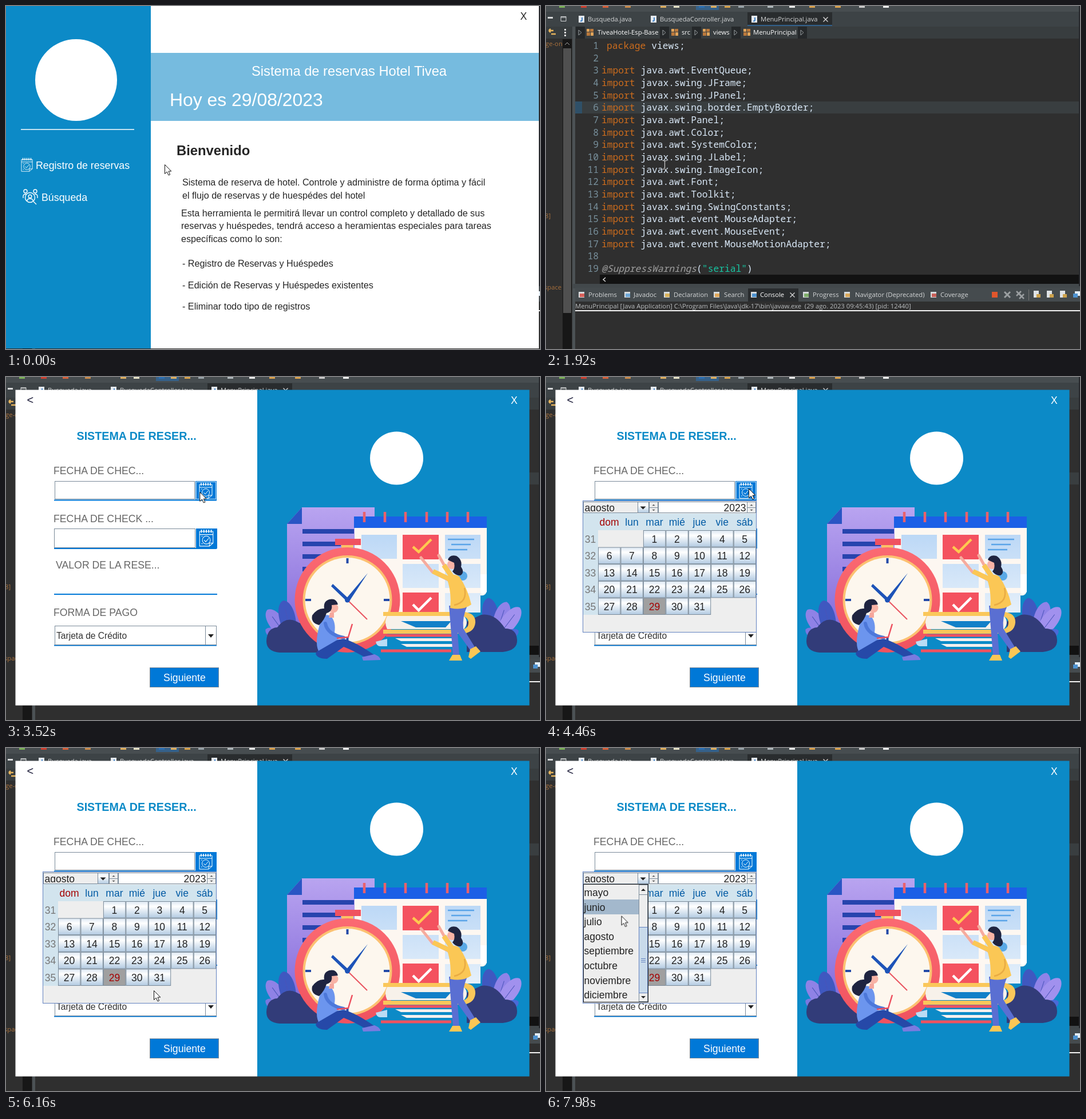
An HTML page for the animation above (8000 ms loop, 933 px wide and 600 px high).

```html
<!DOCTYPE html>
<html lang="es">
<head>
<meta charset="utf-8">
<title>Sistema de reservas</title>
<style>
html, body { margin: 0; width: 100%; height: 100%; overflow: hidden; background: #2f2f2f; }
svg { display: block; }
#stage { width: 933px; height: 600px; font-family: "Liberation Sans", Arial, sans-serif; }
text { white-space: pre; }
.ide { font: 11.25px "Open Sans", "Noto Sans", sans-serif; fill: #d4d6d7; }
.code { font: 16.3px "Noto Sans Mono", "DejaVu Sans Mono", monospace; fill: #d9e8f7; }
.body { font-size: 16.15px; }
.label { font-size: 17.7px; fill: #666; }
.cal { font-size: 17.5px; fill: #222; }
.mid { text-anchor: middle; }
.end { text-anchor: end; }

.menu, .hover, .dialog, .caret, .calendar, .list, .pick, .glow, .arrow, .beam, .beam path, .shape, .click {
  animation: 8s step-end infinite;
}
.menu { animation-name: menu; }
.hover { animation-name: hover; }
.dialog { animation-name: dialog; }
.caret { animation-name: caret; }
.calendar { animation-name: calendar; }
.list { animation-name: list; }
.pick { animation-name: pick; }
.glow { animation-name: glow; }
.arrow, .beam { animation-name: pointer; }
.shape { animation-name: shape; }
.click { animation-name: click; }
.beam { mix-blend-mode: difference; }
.beam path { animation-name: beam; }

@keyframes menu { 0% { opacity: 1 } 24%, 100% { opacity: 0 } }
@keyframes hover { 0% { opacity: 0 } 10.8%, 100% { opacity: 1 } }
@keyframes dialog { 0% { opacity: 0 } 24.875%, 100% { opacity: 1 } }
@keyframes caret { 0% { opacity: 1 } 31% { opacity: 0 } 37.3% { opacity: 1 } 43.5% { opacity: 0 } 49.6% { opacity: 1 } 55%, 100% { opacity: 0 } }
@keyframes calendar { 0% { opacity: 0 } 55%, 100% { opacity: 1 } }
@keyframes list { 0% { opacity: 0 } 95.625%, 100% { opacity: 1 } }
@keyframes pick { 0% { transform: translateY(77px) } 99.75%, 100% { transform: none } }
@keyframes glow { 0% { opacity: 0 } 43.1% { opacity: 1 } 63.25%, 100% { opacity: 0 } }
@keyframes shape { 0% { opacity: 1 } 24% { opacity: 0 } 32.75% { opacity: 1 } 39.75% { opacity: 0 } 43.1%, 100% { opacity: 1 } }
@keyframes beam { 0% { opacity: 0 } 24% { opacity: 1 } 32.75% { opacity: 0 } 39.75% { opacity: 1 } 43.1%, 100% { opacity: 0 } }
@keyframes click {
  0% { opacity: 0 } 19.125% { opacity: 1 } 20.625% { opacity: 0 }
  54.25% { opacity: 1 } 55.75% { opacity: 0 } 94.875% { opacity: 1 } 95.625%, 100% { opacity: 0 }
}
@keyframes pointer {
  0% { transform: translate(277px, 277px) }
  9.125% { transform: translate(277px, 277px); animation-timing-function: steps(7, start) }
  14.95% { transform: translate(205px, 277px) }
  24% { transform: translate(207px, 278px) }
  31% { transform: translate(207px, 278px); animation-timing-function: steps(12, start) }
  41.375% { transform: translate(320px, 205px); animation-timing-function: steps(7, start) }
  47.375% { transform: translate(352px, 198px) }
  48.875% { transform: translate(352px, 198px); animation-timing-function: steps(3, start) }
  51.625% { transform: translate(354px, 195px) }
  62.375% { transform: translate(354px, 195px); animation-timing-function: steps(12, start) }
  72.625% { transform: translate(250px, 379px); animation-timing-function: steps(6, start) }
  77.875% { transform: translate(258px, 424px); animation-timing-function: steps(6, start) }
  83.125% { transform: translate(329px, 256px); animation-timing-function: steps(5, start) }
  88.25% { transform: translate(164px, 229px) }
  89.75% { transform: translate(164px, 229px); animation-timing-function: steps(2, start) }
  91.5% { transform: translate(169px, 232px) }
  98.875% { transform: translate(150px, 263px) }
  99.75%, 100% { transform: translate(131.5px, 293.5px) }
}
</style>
</head>
<body>
<svg id="stage" viewBox="0 0 933 600">
  <defs>
    <linearGradient id="metal" x2="0" y2="1"><stop stop-color="#dde8f3"/><stop offset=".3" stop-color="#fff"/><stop offset="1" stop-color="#b3cbe2"/></linearGradient>
    <linearGradient id="lilac" x2="0" y2="1"><stop stop-color="#b9a4f0"/><stop offset="1" stop-color="#7f66d8"/></linearGradient>
    <linearGradient id="sky" x2="0" y2="1"><stop stop-color="#bcd8f6"/><stop offset="1" stop-color="#e6f0fa"/></linearGradient>
    <linearGradient id="coral" x2="0" y2="1"><stop stop-color="#fb6a72"/><stop offset="1" stop-color="#f0525f"/></linearGradient>
    <symbol id="note" viewBox="0 0 24 30">
      <g fill="none" stroke="#fff">
        <path d="M1 4H23V23L17 28H1ZM1 9H23M23 23H17V28"/>
        <path d="M4 1V6M8 1V6M12 1V6M16 1V6M20 1V6" stroke-width="1.6"/>
        <circle cx="12" cy="18" r="6.5"/><path d="M8.5 18L11 21L16 15M4 12H6M4 24H6"/>
      </g>
    </symbol>
  </defs>

  <g id="ide"></g>

  <g class="menu">
    <rect width="931" height="599" fill="#fff"/>
    <rect width="253" height="599" fill="#0c8ac7"/>
    <rect class="hover" y="250" width="253" height="55" fill="#76bbdf"/>
    <circle cx="122.5" cy="129.5" r="71.5" fill="#fff"/>
    <path d="M26 216H224" stroke="#fff" stroke-width="1.5"/>
    <use href="#note" x="26" y="265" width="21" height="26"/>
    <g fill="none" stroke="#fff" stroke-width="1.4">
      <circle cx="34" cy="324" r="3"/><circle cx="51" cy="324" r="3"/>
      <path d="M30 336V333Q30 329 35 329M55 336V333Q55 329 50 329M48 342L53 347"/>
      <circle cx="42" cy="335" r="8.5"/><circle cx="42" cy="333" r="2.8"/><path d="M37 341Q37 337 42 337T47 341"/>
    </g>
    <g fill="#fff" font-size="17.8"><text x="52" y="285">Registro de reservas</text><text x="62" y="341">Búsqueda</text></g>
    <rect x="253" y="82" width="678" height="119" fill="#76bbdf"/>
    <g fill="#fff">
      <text x="429" y="122" font-size="23.7">Sistema de reservas Hotel Tivea</text>
      <text x="286" y="175" font-size="31.9">Hoy es 29/08/2023</text>
    </g>
    <g fill="#262626">
      <text x="898.5" y="24" font-size="17.5">X</text>
      <text x="298" y="261" font-size="23.8" font-weight="bold">Bienvenido</text>
      <g id="intro" class="body"></g>
    </g>
  </g>

  <g class="dialog">
    <rect x="16.5" y="22.5" width="422.5" height="552" fill="#fff"/>
    <rect x="439" y="22.5" width="475.5" height="552" fill="#0c8ac7"/>
    <text x="36.5" y="47" font-size="20" fill="#1d1d3a">&lt;</text>
    <text x="882" y="47" font-size="17.5" fill="#fff">X</text>
    <text x="123.5" y="110" font-size="19.7" font-weight="bold" fill="#0c8ac7">SISTEMA DE RESER...</text>
    <g class="label">
      <text x="83" y="170">FECHA DE CHEC...</text><text x="83" y="254">FECHA DE CHECK ...</text>
      <text x="87" y="335">VALOR DE LA RESE...</text><text x="83" y="417.5">FORMA DE PAGO</text>
    </g>
    <path d="M84 215.5H368M84 300H368M84 380H369M84 469.5H368" stroke="#0078d7" stroke-width="2"/>
    <g fill="#fff" stroke="#7a8a99">
      <rect x="85.5" y="182.5" width="244" height="31"/><rect x="84.5" y="265.5" width="246" height="33"/>
      <rect x="85.5" y="435.5" width="282" height="33"/><path d="M348.5 435V469"/>
    </g>
    <path d="M353 450H363L358 456Z" fill="#222"/>
    <text x="88" y="458" font-size="15.6" fill="#333">Tarjeta de Crédito</text>
    <path d="M331 182H368V215H331ZM332 265H369V300H332Z" fill="#0078d7"/>
    <use href="#note" x="336" y="184" width="26" height="30"/><use href="#note" x="337" y="266" width="26" height="32"/>
    <rect class="glow" x="332.5" y="183.5" width="34" height="30" fill="none" stroke="#c9dff2"/>
    <path class="caret" d="M87.5 187V211" stroke="#111"/>
    <rect x="251.5" y="508.5" width="120" height="34" fill="#0078d7" stroke="#7a8a99"/>
    <text class="mid" x="312" y="532" font-size="17.7" fill="#fff">Siguiente</text>
    <circle cx="682.5" cy="142" r="46.5" fill="#fff"/>

    <g id="art">
      <path d="M491 257L517 228H644V460H491Z" fill="url(#lilac)"/>
      <path d="M491 257L517 228V257Z" fill="#2a55c4"/>
      <path d="M518 270H608M518 292H585M518 314H560M518 336H540" stroke="#2744ae" stroke-width="8"/>
      <path d="M609 250H840V374Q838 384 829 382V412H609Z" fill="#fdf7f1"/>
      <path d="M829 345V374Q830 384 840 376V345Z" fill="#fff"/>
      <path d="M608 244H840V264H608Z" fill="#1c5fe6"/>
      <path d="M626 236V254M662 236V254M698 236V254M735 236V254M771 236V254M807 236V254" stroke="#e9616d" stroke-width="4.5"/>
      <path d="M621 276H683V318H621ZM767 276H829V318H767ZM693 327H756V369H693ZM767 327H829V369H767ZM767 378H829V412H767Z" fill="url(#sky)"/>
      <path d="M693 276H756V319H693ZM693 377H756V412H693Z" fill="#f4525f"/>
      <path d="M711 297L721 306L743 284" fill="none" stroke="#ffc94f" stroke-width="4.5"/>
      <path d="M711 398L721 408L743 386" fill="none" stroke="#fff" stroke-width="4.5"/>
      <path d="M772 284H818M778 293H812M772 302H806" stroke="#5aa4e8" stroke-width="2.5"/>
      <circle cx="798" cy="348" r="8" fill="#5aa9e6"/>
      <g id="plants"></g>
      <path d="M455 462Q456 439 474 438Q490 416 512 430L560 444V482H478Q455 480 455 462Z" fill="#323c79"/>
      <path d="M893 460Q892 440 872 440Q854 412 830 416L805 428V481H868Q894 478 893 460Z" fill="#323c79"/>

      <path d="M586 292H607V302H586Z" fill="#fbc265"/><rect x="575" y="283" width="45" height="11" fill="#f05260"/>
      <circle cx="596.5" cy="390" r="92" fill="url(#coral)"/>
      <circle cx="596.5" cy="390" r="78" fill="#fcc171"/><circle cx="596.5" cy="390" r="74" fill="#fdf7ee"/>
      <path d="M596.5 317V326M523 390H533M660 390H670M596.5 454V463" stroke="#234aa8" stroke-width="4"/>
      <path d="M595 392L568 366L571 362L599 388ZM594 388L632 343L600 392Z" fill="#1d53b8"/>
      <path d="M596.5 390L631 424" stroke="#e95460" stroke-width="2"/><circle cx="596.5" cy="390" r="4.5" fill="#1d53b8"/>

      <path d="M646 463Q648 472 655 471H666V458Z" fill="#b9dcf5"/>
      <path d="M666 418H800Q810 429 800 441H666Q660 429 666 418Z" fill="#f7f1ea"/>
      <path d="M659 411H802Q821 414 820 430Q818 447 798 449H659V442H796Q808 440 808 430Q808 420 796 418H659Z" fill="#fac75a"/>
      <path d="M690 427H778L768 438H716Z" fill="#1280c8"/>
      <path d="M680 457H782V462H690ZM690 467H780V472H700Z" fill="#f5f0ee"/>
      <path d="M664 452H780M655 479H778" stroke="#f05260" stroke-width="5"/>

      <path d="M541 484Q554 462 590 458Q612 464 643 486L630 492Q606 478 590 472L561 493Q544 493 541 484Z" fill="#2649a8"/>
      <path d="M622 490L644 485Q655 490 654 495L624 496Z" fill="#7a7be0"/>
      <path d="M551 423Q557 413 567 418Q577 428 574 447L582 458L546 479Q538 463 551 423Z" fill="#6c95ee"/>
      <path d="M558 431Q561 450 590 456" fill="none" stroke="#4d78da" stroke-width="6" stroke-linecap="round"/>
      <path d="M605 432L598 455L578 457" fill="none" stroke="#ee505f" stroke-width="2.5"/>
      <path d="M566 412H573V421H564Z" fill="#f5a79d"/><circle cx="572" cy="404" r="8.5" fill="#f8b3a5"/>
      <path d="M580 398Q577 386 565 389Q554 392 556 405Q544 404 535 417Q532 430 547 434Q557 424 560 413Q571 410 569 399Z" fill="#1f2440"/>

      <path d="M774 400H806Q797 420 799 440L820 474L812 479L789 447L792 488H781Z" fill="#5a6fd2"/>
      <path d="M780 486H793L797 496H774ZM811 476L821 471L829 480L812 493L808 490Z" fill="#fbc755"/>
      <path d="M773 355L745 341L725 316M775 346L756 312" fill="none" stroke="#f6ab9e" stroke-width="5" stroke-linecap="round"/>
      <path d="M776 354L746 340M778 348L765 329" stroke="#fbc755" stroke-width="8.5"/>
      <path d="M770 352Q780 341 792 349Q807 371 813 398Q798 409 776 404Q779 376 770 352Z" fill="#fbc755"/>
      <path d="M783 399Q807 394 801 369" fill="none" stroke="#e9ab43" stroke-width="2.5"/>
      <circle cx="779" cy="328" r="8" fill="#f8b3a5"/>
      <path d="M772 320Q775 310 787 313Q798 320 795 332Q802 342 794 347Q786 348 780 340Q785 335 783 325Z" fill="#1f2440"/>
    </g>
  </g>

  <g id="calendar" class="calendar"></g>
  <g id="list" class="list"></g>

  <g class="arrow">
    <circle class="click" r="12" fill="#ff0" fill-opacity=".47"/>
    <path class="shape" d="M.5 .5V16.5L4.2 13L7 19L9.6 18L7 12H11.8Z" fill="#fff" stroke="#111"/>
  </g>
  <g class="beam"><path d="M-3.5 -7.5H-1L.5 -6.5L2 -7.5H4.5M.5 -7V7M-3.5 7.5H-1L.5 6.5L2 7.5H4.5" fill="none" stroke="#fff" stroke-width="1.2"/></g>
</svg>

<script>
const put = (id, markup) => document.getElementById(id).innerHTML = markup;
const text = (x, y, value, attrs = '') => `<text x="${x}" y="${y}" ${attrs}>${value}</text>`;
const rect = (x, y, w, h, fill, attrs = '') => `<rect x="${x}" y="${y}" width="${w}" height="${h}" fill="${fill}" ${attrs}/>`;
const path = (d, stroke, attrs = '') => `<path d="${d}" fill="none" stroke="${stroke}" ${attrs}/>`;
const cross = (x, y, r, color, w = 1.2) =>
  path(`M${x - r} ${y - r}L${x + r} ${y + r}M${x + r} ${y - r}L${x - r} ${y + r}`, color, `stroke-width="${w}"`);
const triangle = (x, y, r, dir, color = '#222') => `<path d="M${x - r} ${y - dir * r / 2}h${2 * r}l${-r} ${dir * r}Z" fill="${color}"/>`;

put('intro', [
  [308, 314, 'Sistema de reserva de hotel. Controle y administre de forma óptima y fácil'],
  [308, 337, 'el flujo de reservas y de huespédes del hotel'],
  [306, 368, 'Esta herramienta le permitirá llevar un control completo y detallado de sus'],
  [306, 390, 'reservas y huéspedes, tendrá acceso a heramientas especiales para tareas'],
  [306, 413, 'específicas como lo son:'],
  [308, 456, '- Registro de Reservas y Huéspedes'],
  [308, 494, '- Edición de Reservas y Huéspedes existentes'],
  [308, 531, '- Eliminar todo tipo de registros']
].map(line => text(...line)).join(''));

// Code editor behind both windows
const imports = ['.awt.EventQueue', 'x.swing.JFrame', 'x.swing.JPanel', 'x.swing.border.EmptyBorder', '.awt.Panel',
  '.awt.Color', '.awt.SystemColor', 'x.swing.JLabel', 'x.swing.ImageIcon', '.awt.Font', '.awt.Toolkit',
  'x.swing.SwingConstants', '.awt.event.MouseAdapter', '.awt.event.MouseEvent', '.awt.event.MouseMotionAdapter'];
const span = (color, value) => `<tspan fill="${color}">${value}</tspan>`;
const code = [
  span('#cc6c1d', 'package') + ' views;', '',
  ...imports.map(name => `${span('#cc6c1d', 'import')} java${name};`), '',
  `<tspan fill="#a0a0a0" font-style="italic">@SuppressWarnings</tspan>(${span('#17c6a3', '"serial"')})`
];
const fileIcon = (x, y) => rect(x, y, 10, 12, '#e4e9ee') + path(`M${x + 6} ${y + 3}v5q-1 2 -3 1`, '#2f78c4', 'stroke-width="1.8"');
const boxIcon = (x, y) => rect(x, y, 5, 5, '#e0a45a') + rect(x + 6, y, 6, 5, '#b9783c') + rect(x, y + 6, 6, 6, '#b9783c') + rect(x + 7, y + 6, 5, 6, '#e0a45a');

const toolbar = [[28, '#7cb25a'], [66, '#d04030'], [104, '#d8603a'], [143, '#c98a4a'], [205, '#e0b060'], [228, '#e8e4c8'],
  [272, '#2c6fb4'], [293, '#e0b060'], [317, '#d8a24a'], [341, '#9aa4aa'], [392, '#b0b8bc'], [430, '#eee'],
  [465, '#dba24e'], [510, '#dba24e'], [552, '#ccc'], [594, '#f2f2f2']]
  .map(([x, color]) => rect(x - 5, 0, 10, 3, color)).join('');
const fileTabs = [[57, 'Busqueda.java'], [183, 'BusquedaController.java'], [359, 'MenuPrincipal.java']]
  .map(([x, name]) => fileIcon(x, 17) + text(x + 16, 27, name)).join('');
const crumbs = [[71, 90, 'TiveaHotel-Esp-Base'], [219, 237, 'src'], [274, 292, 'views'], [345, 362, 'MenuPrincipal']]
  .map(([icon, x, name]) => boxIcon(icon, 40) + text(x, 50, name, 'fill="#fff"')).join('');
const crumbMarks = [59, 206, 262, 331, 447]
  .map(x => rect(x - 7, 36, 16, 21, '#25282a') + path(`M${x - 2} 42v9l5 -4.5Z`, '#9a9fa2')).join('');
const views = [[57, 74, 'Problems', '#d9605a'], [137, 153, 'Javadoc', '#6fa8d8'], [206, 223, 'Declaration', '#d9b25a'],
  [293, 311, 'Search', '#e0a85a'], [358, 374, 'Console', '#4f93d0'], [449, 466, 'Progress', '#7fae6a'],
  [521, 540, 'Navigator (Deprecated)', '#d9a85a'], [672, 689, 'Coverage', '#c9605a']]
  .map(([icon, x, name, color]) => rect(icon, 500, 10, 10, '#d8dcde') + rect(icon + 2, 503, 8, 6, color)
    + text(x, 509, name, name === 'Console' ? 'fill="#fff"' : '')).join('');
const consoleTools = rect(779, 500, 10, 10, '#e0562c') + cross(806, 505, 5, '#9b9fa1', 3)
  + cross(826, 503, 4, '#9b9fa1', 2.5) + cross(831, 508, 4, '#9b9fa1', 2.5)
  + [852, 875, 898].map(x => rect(x, 498, 9, 12, '#dfe3e6') + rect(x + 5, 504, 7, 6, '#cda24c')).join('')
  + rect(924, 499, 9, 8, '#e4eef6') + rect(921, 503, 8, 7, '#4f93d0');
const scraps = [[-1, 70, 'ge-one'], [-2, 371, '8]'], [-3, 496, 'space']]
  .map(([x, y, word]) => text(x, y, word, 'fill="#a8703c"')).join('');

put('ide', `
  ${rect(0, 0, 933, 600, '#2f2f2f')}${rect(0, 0, 933, 10, '#474d50')}${rect(0, 10, 933, 26, '#3d4346')}
  ${rect(0, 36, 933, 21, '#383d3f')}${rect(262, 0, 40, 7, '#35618a')}${toolbar}
  ${rect(352, 11, 148, 24, '#292c2e')}${rect(352, 33, 148, 2, '#31608c')}
  <g class="ide">${fileTabs}${crumbMarks}${crumbs}${scraps}</g>${cross(488.5, 23.5, 4, '#ddd')}
  ${rect(3, 19, 9, 3, '#d6d8d9')}${path('M26 18.5h9v8h-9ZM26 20h9', '#d6d8d9')}
  ${path('M5 43h8M5 43l3 -3M5 43l3 3M17 49H9', '#e6b45c', 'stroke-width="2.5"')}
  <path d="M32 40h3v3h-3zM32 45h3v3h-3zM32 50h3v3h-3z" fill="#ddd"/>
  ${rect(29, 58, 16, 542, '#171717')}${rect(30, 74, 14, 463, '#505050')}${path('M33 68l4 -4l4 4', '#aaa')}
  ${rect(46, 36, 5, 564, '#4c5255')}
  ${rect(51, 167, 880, 21, '#393e40')}${rect(51, 167, 12, 21, '#2f5068')}
  <g class="code">${code.map((line, i) => {
    const y = 75 + i * 21.67;
    return text(92, y, i + 1, 'class="end" fill="#78909c"') + text(i ? 97 : 106, y, line);
  }).join('')}</g>
  ${rect(94, 470, 837, 16, '#121212')}${path('M104 475l-4 3.5l4 3.5', '#ddd', 'stroke-width="1.5"')}
  ${rect(47, 486, 886, 8, '#42484b')}${rect(51, 493, 882, 24, '#454b4e')}${rect(353, 494, 88, 23, '#292c2e')}
  <g class="ide">${views}${text(51, 529, 'MenuPrincipal [Java Application] C:\\Program Files\\Java\\jdk-17\\bin\\javaw.exe  (29 ago. 2023 09:45:43) [pid: 12440]', 'fill="#b9bcbe"')}</g>
  ${cross(430.5, 505.5, 4, '#ddd')}${consoleTools}${path('M843.5 496V515', '#777')}
  ${rect(51, 532, 882, 2, '#f4f4f4')}${rect(931, 0, 2, 490, '#25272b')}`);

// Foliage around the illustration
const leaf = (x, y, angle, size, color) =>
  `<g transform="translate(${x} ${y}) rotate(${angle})"><path d="M0 0C${-size * .26} ${-size * .4} ${-size * .22} ${-size * .95} 0 ${-size}C${size * .22} ${-size * .95} ${size * .26} ${-size * .4} 0 0" fill="${color}"/>${path(`M0 0V${-size * .8}`, '#4a55b8')}</g>`;
put('plants', leaf(500, 467, -61, 53, '#7a78e0') + leaf(500, 467, -36, 74, '#8f82e6') + leaf(502, 467, -13, 78, '#3f58c0')
  + leaf(852, 464, -7, 78, '#3f58c0') + leaf(852, 464, 18, 74, '#8f83e8')
  + leaf(852, 464, 37, 76, '#a191ee') + leaf(852, 464, 65, 48, '#4a6ad8'));

// Date picker
const column = i => 91 + i * 39.45;
const row = i => 268 + i * 29.6;
const weekdays = ['dom', 'lun', 'mar', 'mié', 'jue', 'vie', 'sáb'];
const days = Array.from({ length: 31 }, (_, i) => {
  const slot = i + 2, x = column(slot % 7), y = row(Math.floor(slot / 7)), today = i === 28;
  return rect(x + .5, y + .5, 38.4, 28.6, today ? '#a0a0a0' : 'url(#metal)', 'stroke="#7a8a99"')
    + text(x + 19.5, y + 21.5, i + 1, `class="mid" ${today ? 'fill="#a40000"' : ''}`);
}).join('');
const spinner = x => rect(x + .5, 218.5, 15, 19, '#eee', 'stroke="#7a8a99"') + path(`M${x} 228.5h16`, '#7a8a99')
  + triangle(x + 8, 224, 2.5, -1, '#555') + triangle(x + 8, 233, 2.5, 1, '#555');
put('calendar', `
  ${rect(64.5, 216.5, 303, 230, '#eee', 'stroke="#6382bf"')}
  ${rect(65, 239, 302, 29, '#d2e4ee')}${rect(65, 239, 26, 177, '#d2e4ee')}
  ${rect(65.5, 218.5, 114, 19, '#eee', 'stroke="#7a8a99"')}${rect(160.5, 218.5, 19, 19, 'url(#metal)', 'stroke="#7a8a99"')}
  ${triangle(169.5, 229, 5, 1)}${spinner(180)}
  ${rect(196.5, 218.5, 155, 19, '#fff', 'stroke="#7a8a99"')}${spinner(351)}
  <g class="cal">${text(67.5, 234.5, 'agosto')}${text(349.5, 235, 2023, 'class="end"')}
  ${rect(66, 235, 93, 2, '#eee')}${rect(66, 238, 93, 1, '#d2e4ee')}${path('M66 237.5H160', '#7a8a99')}
  ${weekdays.map((day, i) => text(column(i) + 19.5, 260, day, `class="mid" fill="${i ? '#005aa4' : '#a40000'}"`)).join('')}
  ${[31, 32, 33, 34, 35].map((week, i) => text(77.5, row(i) + 21.5, week, 'class="mid" fill="#777"')).join('')}${days}</g>`);

const months = ['mayo', 'junio', 'julio', 'agosto', 'septiembre', 'octubre', 'noviembre', 'diciembre'];
put('list', `
  ${rect(65.5, 238.5, 113, 206, '#eee', 'stroke="#222"')}
  <g class="pick">${rect(66, 265, 96, 26, '#a3b8cc')}</g>
  <g class="cal">${months.map((name, i) => text(66.5, 259 + i * 25.6, name)).join('')}</g>
  ${rect(162.5, 239.5, 15, 204, '#eee', 'stroke="#7a8a99"')}${path('M162 256.5h16M162 428.5h16', '#7a8a99')}
  ${rect(162.5, 313.5, 15, 115, '#c8daeb', 'stroke="#6382bf"')}
  ${path('M166 368.5h8M166 371.5h8M166 374.5h8', '#6382bf')}
  ${triangle(170, 248, 4, -1)}${triangle(170, 436, 4, 1)}`);
</script>
</body>
</html>
```
